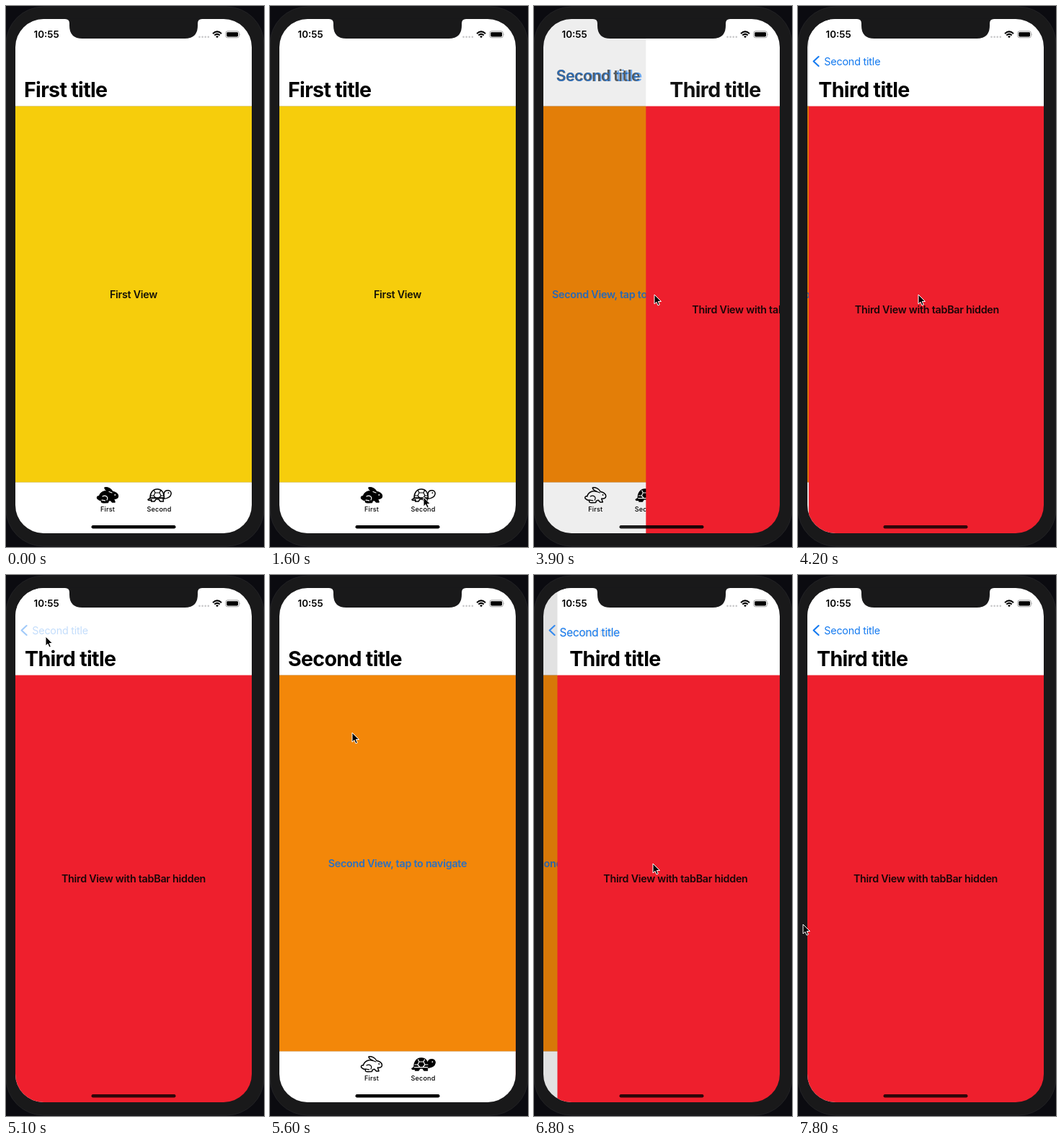
An HTML page that plays this animation: 358x748 px, repeating every 8000 ms.

```html
<!DOCTYPE html>
<html lang="en">
<head>
<meta charset="utf-8">
<title>Tab and stack navigation</title>
<style>
  html, body { margin: 0; width: 100%; height: 100%; overflow: hidden; background: #0b0b10; }
  svg { display: block; width: 358px; height: 748px; }
  text { font-family: Inter, Roboto, sans-serif; font-optical-sizing: none; }
  .title { font-size: 28.6px; font-weight: 700; letter-spacing: -.024em; }
  .body { font-size: 14.3px; font-weight: 600; letter-spacing: -.018em; text-anchor: middle; }
  .back { font-size: 14.3px; letter-spacing: -.015em; fill: #147af0; }
  .tab { font-size: 9.1px; font-weight: 500; letter-spacing: .02em; text-anchor: middle; }
  .clock { font-size: 13.4px; font-weight: 600; }
  .icon { --shape: #fff; --detail: #000; fill: var(--shape); stroke: #000; stroke-width: 1.5; stroke-linejoin: round; stroke-linecap: round; }
  .icon.on { --shape: #000; --detail: #fff; }
  .detail { fill: none; stroke: var(--detail); stroke-width: 1.2; }
  .eye { fill: var(--detail); stroke: none; }
</style>
</head>
<body>
<svg viewBox="0 0 358 748">
  <defs>
    <clipPath id="screen"><rect x="13" y="18" width="328" height="711" rx="39"/></clipPath>
  </defs>

  <rect y="1" width="358" height="746" rx="52" fill="#19191a" stroke="#222225"/>

  <g clip-path="url(#screen)">
    <g id="root">
      <rect x="13" y="18" width="328" height="711" fill="#fff"/>
      <rect id="page" x="13" y="138.5" width="328" height="520"/>
      <path d="M13 138.5H341M13 658.5H341" stroke="#000" stroke-opacity=".18" stroke-width=".6"/>
      <text id="rootText" class="body" x="177" y="404"></text>

      <g id="hare" class="icon">
        <path d="M155.5 677.5C155.5 674 151 672 148 671.5C146 667.5 141 665 137 666C137 669 140 670 143 671.5C137 669.5 131 672 129.5 678C126 677 125.5 681.5 128.5 682C129.5 683.6 131 683.3 132.5 683.2C131.5 685.5 133 687 136 686.8L141.5 686.5C141.5 684.5 142.5 683.5 145 683.2L147.5 686H151C151 684 149.5 683 149.5 681C152.5 681.8 155.5 680.5 155.5 677.5Z"/>
        <path class="detail" d="M134 678C138 675.5 142.5 679 140 683M133 683.2L137.5 683.8M143 671.5L147 673"/>
        <circle class="eye" cx="151.3" cy="676" r=".9"/>
      </g>
      <text class="tab" x="141" y="699">First</text>

      <g id="turtle" class="icon">
        <path d="M201 680L197 682.5C198 684 200 683.5 202 682.5L201.5 685H206L208 682H212L214 685H218.5L218 681.5C224 681 228.5 679 229.2 674.5C229.5 671 227 669.5 224 669.7C220.5 670 219 672 219 676"/>
        <path d="M200 680C200 672.5 204 668 210 668C216 668 219 673 219.5 680Z"/>
        <path class="detail" d="M207 673H213L215 677L212.5 680M207 673L205 677L207.5 680M207 673L205.5 670M213 673L214.5 670M205 677L201 677M215 677L219 677M200.5 680.7H219"/>
        <circle class="eye" cx="225.4" cy="673.2" r=".9"/>
      </g>
      <text class="tab" x="212.5" y="699">Second</text>
      <rect id="dim" x="13" y="18" width="328" height="711"/>
    </g>

    <g id="third">
      <rect x="13" y="18" width="328" height="121" fill="#fff"/>
      <rect x="13" y="138.5" width="328" height="591" fill="#ee1f2d"/>
      <text class="body" x="177" y="425" fill="#1a0608">Third View with tabBar hidden</text>
    </g>

    <text id="rootTitle" class="title"></text>
    <text id="thirdTitle" class="title" x="26" y="126">Third title</text>
    <text id="backLabel" class="back">Second title</text>
    <path id="chevron" d="M28.6 70L21.6 76.5L28.6 83" fill="none" stroke="#147af0" stroke-width="2.1" stroke-linecap="round" stroke-linejoin="round"/>
    <rect id="home" x="118.5" y="718" width="117" height="4.4" rx="2.2"/>

    <text class="clock" x="38.5" y="44">10:55</text>
    <path d="M268.5 42.7h14" stroke="#c6c6c8" stroke-width="2.6" stroke-linecap="round" stroke-dasharray="0 4.1"/>
    <g fill="none" stroke="#000" stroke-width="2">
      <path d="M287 38.2Q293 32.6 299 38.2M289.3 40.6Q293 37.2 296.7 40.6"/>
      <path d="M291 42Q293 40.6 295 42L293 44.2Z" fill="#000" stroke="none"/>
    </g>
    <rect x="304.8" y="34.8" width="18.6" height="9" rx="2.6" fill="none" stroke="#999" stroke-width=".9"/>
    <rect x="306.2" y="36.2" width="15.8" height="6.2" rx="1.4"/>
    <path d="M324.6 37.8q1.4 1.5 0 3z" fill="#999"/>
  </g>

  <path d="M80 17.5H274V18H272Q266 18 266 24V27Q266 45 248 45H106Q88 45 88 27V24Q88 18 82 18H80Z" fill="#19191a"/>
  <path id="cursor" d="M0 0V13L3 10.3L5 15L7.3 14L5.3 9.5H9.5Z" stroke="#fff" stroke-width="1" stroke-linejoin="round"/>
</svg>

<script>
const LOOP = 8000, STEP = 100, WIDTH = 328, SLIDE = 500;
const SWITCH = 2700, CURSOR_IN = 800;
const PUSH_1 = 3812, POP = 5130, PUSH_2 = 6573;
const PRESS = [5050, 5150];

// [time, x, y] of the pointer tip
const track = [
  [800, 250, 706], [1000, 259, 673], [1300, 213, 679], [3050, 213, 679],
  [3600, 167, 399], [4250, 167, 399], [4800, 55, 85], [5150, 55, 85],
  [5600, 114, 218], [5750, 114, 218], [6250, 165, 399], [6850, 165, 399],
  [7500, 6, 478], [7650, 7, 503], [7800, 7, 483]
];

const $ = id => document.getElementById(id);
const clamp = v => Math.min(1, Math.max(0, v));
const mix = (a, b, k) => a + (b - a) * k;
const set = (id, attrs) => {
  for (const name in attrs) $(id).setAttribute(name, attrs[name]);
};

// cubic-bezier(.32, .72, 0, 1)
function slideEase(x) {
  if (x <= 0 || x >= 1) return clamp(x);
  let low = 0, high = 1;
  for (let i = 0; i < 24; i++) {
    const s = (low + high) / 2, r = 1 - s;
    if (.96 * r * r * s + s ** 3 < x) low = s; else high = s;
  }
  const s = low, r = 1 - s;
  return 2.16 * r * r * s + 3 * r * s * s + s ** 3;
}

function pushed(t) {
  const since = start => slideEase((t - start) / SLIDE);
  return t < POP ? since(PUSH_1) : t < PUSH_2 ? 1 - since(POP) : since(PUSH_2);
}

function pointer(t) {
  const next = track.findIndex(point => point[0] > t);
  if (next < 0) return track[track.length - 1].slice(1);
  if (next === 0) return track[0].slice(1);
  const [t0, x0, y0] = track[next - 1], [t1, x1, y1] = track[next];
  const k = (t - t0) / (t1 - t0), e = k * k * (3 - 2 * k);
  return [mix(x0, x1, e), mix(y0, y1, e)];
}

function draw(t) {
  const second = t >= SWITCH;
  const p = pushed(t), q = p ** 1.2;
  const pressed = t >= PRESS[0] && t < PRESS[1];

  set('page', { fill: second ? '#f38709' : '#f6cd0c' });
  set('rootText', { fill: second ? '#2a70c2' : '#151208' });
  $('rootText').textContent = second ? 'Second View, tap to navigate' : 'First View';
  $('rootTitle').textContent = second ? 'Second title' : 'First title';
  $('hare').classList.toggle('on', !second);
  $('turtle').classList.toggle('on', second);

  set('root', { transform: `translate(${-.3 * WIDTH * p})` });
  set('dim', { opacity: .12 * p });
  set('third', { transform: `translate(${WIDTH * (1 - p)})` });
  set('thirdTitle', { transform: `translate(${WIDTH * (1 - q)})`, opacity: p ? clamp(2 * q - .08) : 0 });

  // The large title shrinks into the back label while the two crossfade.
  const ratio = 76 / 159, scale = mix(1, ratio, q);
  const place = `translate(${mix(25, 36.3, q)} ${mix(126, 82, q)})`;
  set('rootTitle', { transform: `${place} scale(${scale})`, opacity: clamp(1.25 - 1.25 * q) });
  set('backLabel', {
    transform: `${place} scale(${scale / ratio})`,
    opacity: pressed ? .25 : clamp(1.25 * q)
  });
  set('chevron', { opacity: pressed ? .4 : clamp((p - .6) / .4) });
  set('home', { opacity: 1 - .2 * p });

  const [x, y] = pointer(t);
  set('cursor', { transform: `translate(${x} ${y})`, opacity: t < CURSOR_IN ? 0 : 1 });
}

function tick() {
  const t = performance.now() % LOOP;
  draw(Math.floor(t / STEP) * STEP);
  requestAnimationFrame(tick);
}
tick();
</script>
</body>
</html>
```
